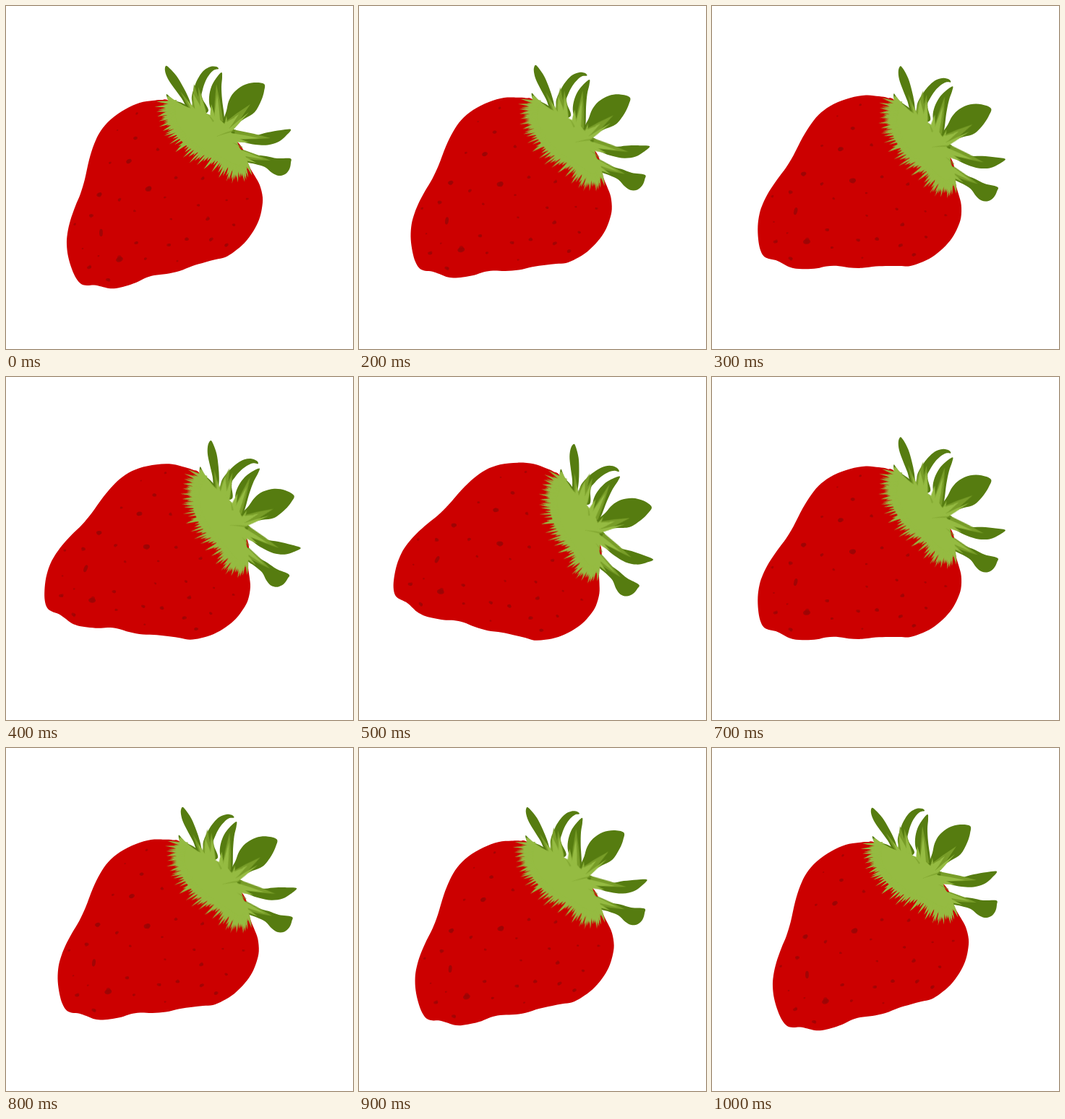
These frames come from a looping animation (480 px wide and 475 px high, 1.1 s). An HTML page:

```html
<!DOCTYPE html>
<html lang="en">
<head>
<meta charset="utf-8">
<title>Rocking strawberry</title>
<style>
  html, body { margin: 0; width: 100%; height: 100%; overflow: hidden; background: #fff; }
  svg { display: block; width: 100vw; height: 100vh; }
</style>
</head>
<body>
<svg viewBox="0 0 480 475">
  <defs>
    <filter id="soft" x="-10%" y="-10%" width="120%" height="120%">
      <feGaussianBlur stdDeviation="0.6"/>
    </filter>
  </defs>
  <g id="berry">
    <g id="body"></g>
    <g id="seeds" fill="#9c0505"></g>
    <g id="leaves" fill="#567c10"></g>
    <g id="calyx" fill="#95bb42" filter="url(#soft)"></g>
  </g>
</svg>
<script>
const RED = '#cc0000', SHADE = '#789d28';
const STEP = 100, STEPS = 11;
const ANGLES = [0, 4.2, 8.4, 14.6, 23.1, 28.6];

const byId = id => document.getElementById(id);
const berry = byId('berry');

function add(parent, tag, attrs) {
  const node = document.createElementNS('http://www.w3.org/2000/svg', tag);
  for (const key in attrs) node.setAttribute(key, attrs[key]);
  byId(parent).appendChild(node);
}

let seed = 11;
function random() {
  seed = (seed * 16807) % 2147483647;
  return seed / 2147483647;
}

const pairs = text => text.trim().split(/\s+/).map(p => p.split(',').map(Number));

// Closed Catmull-Rom curve through the points
function smooth(points) {
  const n = points.length, at = i => points[(i + n) % n];
  let d = 'M' + points[0];
  for (let i = 0; i < n; i++) {
    const [a, b, c, e] = [at(i - 1), at(i), at(i + 1), at(i + 2)];
    const c1 = b.map((v, k) => v + (c[k] - a[k]) / 6);
    const c2 = c.map((v, k) => v - (e[k] - b[k]) / 6);
    d += `C${c1} ${c2} ${c}`;
  }
  return d + 'Z';
}

// Point at u (0..1) along a polyline with evenly weighted segments
function along(points, u) {
  const f = u * (points.length - 1), i = Math.min(Math.floor(f), points.length - 2);
  return points[i].map((v, k) => v + (points[i + 1][k] - v) * (f - i));
}

// Slim tapered hair from a wide base to a pointed tip, bowed sideways
function hair([x1, y1], [x2, y2], width, bow = 0, attrs = {}) {
  const dx = x2 - x1, dy = y2 - y1, len = Math.hypot(dx, dy) || 1;
  const nx = -dy / len, ny = dx / len, h = width / 2;
  const mx = (x1 + x2) / 2 + nx * bow, my = (y1 + y2) / 2 + ny * bow;
  const d = `M${x1 + nx * h},${y1 + ny * h}Q${mx + nx * h * .7},${my + ny * h * .7} ${x2},${y2}` +
            `Q${mx - nx * h * .7},${my - ny * h * .7} ${x1 - nx * h},${y1 - ny * h}Z`;
  add('calyx', 'path', { d, ...attrs });
}

function drawBody() {
  const outline = pairs(`228,132 215,130 203,131 185,134 165,143 145,157 131,173 122,191 115,213
    109,240 103,260 96,277 89,297 85,315 84,330 86,347 91,364 97,377 104,385 112,387 122,386.5
    132,388.5 142,391 152,391 165,388 180,383 192,377 205,373 222,371 240,367 258,360 275,355
    290,351 303,348 316,340 330,328 342,312 350,296 354,280 355,265 351,248 344,235 336,221
    322,190 280,160`);
  add('body', 'path', { d: smooth(outline), fill: RED });
}

function drawSeeds() {
  // x, y, radius
  const spots = pairs(`181,149,2 154,172,1.3 179,183,3 144,217,2 170,215,4 210,199,2.5 197,253,4.6
    235,238,2.6 272,239,2.6 129,261,3.8 157,268,2.6 220,265,1.8 118,290,3 95,302,2 178,284,2
    228,295,1.8 266,276,2.3 279,295,3 305,269,1.7 334,267,2 315,303,2.4 180,328,2.8 225,331,2.8
    250,323,3 284,323,3 305,331,3 157,351,5 193,350,2.2 115,362,3 141,379,3 237,353,1.6
    106,336,1.4 128,346,1.5`);
  const spot = (x, y, rx, ry, turn, opacity) => add('seeds', 'ellipse',
    { cx: x, cy: y, rx, ry, opacity, transform: `rotate(${turn} ${x} ${y})` });
  for (const [x, y, r] of spots) {
    const opacity = Math.min(.9, .3 + r * .16);
    spot(x, y, r, r * .68, -35 + random() * 40, opacity);
    spot(x + (random() - .5) * r, y + (random() - .5) * r, r * .6, r * .75, 0, opacity * .7);
  }
  spot(131.5, 314, 2.4, 5.2, 0, .9);
}

function drawLeaves() {
  [
    '221,83 226,86 236,97 245,112 252,126 257,139 262,150 250,140 243,128 232,113 224,101 220,90',
    '257,130 261,111 267,98 274,89 283,84 291,84 294,87 288,88.5 282,94 276,104 272,116 271,127 280,145 266,150',
    '298,92 299,99 298,112 299,130 302,158 296,166 288,152 282,139 281,126 284,112 290,101',
    '357,108 343,106 328,110 315,120 308,132 305,145 301,158 303,168 317,164 330,156 344,147 353,131 357,118',
    '394,171 380,172 362,175 345,179 328,177 312,170 312,183 330,189 345,192 362,192.5 377,188 387,180',
    '393,211 375,211 360,208 345,206 330,201 318,196 328,214 345,219 358,223 368,231 377,235 386,233 392,226 394,217',
    '222,122 232,130 245,135 258,143 240,142 226,132'
  ].forEach(text => add('leaves', 'path', { d: smooth(pairs(text)) }));
}

function drawCalyx() {
  const shade = { fill: SHADE };
  // Mid-green transitions, then light streaks running into each leaf
  [
    ['264,146', '260,108', 14], ['272,146', '266,112', 10], ['294,160', '291,108', 13],
    ['306,168', '338,136', 15], ['316,178', '366,183', 13], ['326,205', '366,214', 13],
    ['258,144', '241,118', 6]
  ].forEach(([a, b, w]) => hair(pairs(a)[0], pairs(b)[0], w, 0, shade));
  [
    ['268,150', '259,121', 11], ['274,152', '268,120', 8], ['262,148', '250,130', 6],
    ['292,164', '292,122', 9], ['286,158', '284,136', 8], ['300,172', '322,150', 11],
    ['304,170', '305,152', 5], ['306,176', '336,147', 6], ['308,180', '350,183', 9],
    ['312,184', '336,189', 7], ['314,200', '356,212', 9], ['320,208', '346,217', 7]
  ].forEach(([a, b, w]) => hair(pairs(a)[0], pairs(b)[0], w));

  const core = pairs(`224,125 239,134 256,142 267,143 278,149 290,154 300,161 306,169 313,177
    319,186 323,196 331,207 333,219 326,229 312,226 300,219 284,210 268,204 252,195 240,184
    233,173 229,160 225,146 225,135`);
  add('calyx', 'path', { d: smooth(core) });

  const roots = pairs(`236,133 234,142 234,150 236,160 242,170 254,184 269,196 283,203 299,210
    312,217 319,220 326,220 329,212`);
  const tips = pairs(`206,132 205,145 207,157 212,169 216,181 232,200 248,216 266,222 283,232
    303,242 316,250 333,245 341,236`);
  const count = 64;
  for (let i = 0; i < count; i++) {
    const u = i / (count - 1);
    const root = along(roots, u), tip = along(tips, u);
    const reach = i % 3 ? .52 + random() * .34 : .84 + random() * .18;
    const end = root.map((v, k) => v + (tip[k] - v) * reach);
    hair(root, end, 4.2 + random() * 2, (random() - .5) * 4);
  }

  // Faint creases near the leaf bases
  [['299,163', '316,154'], ['290,181', '318,172'], ['313,189', '327,196'], ['279,150', '287,160']]
    .forEach(([a, b]) => hair(pairs(b)[0], pairs(a)[0], 2.4, 1, { fill: SHADE, opacity: .6 }));
}

function render(time) {
  const step = Math.floor(time / STEP) % STEPS;
  const angle = ANGLES[5 - Math.abs(5 - step)];
  berry.setAttribute('transform', `rotate(${angle} 240 237.5)`);
}

drawBody();
drawSeeds();
drawLeaves();
drawCalyx();

const start = performance.now();
function tick() {
  render(performance.now() - start);
  requestAnimationFrame(tick);
}
tick();
</script>
</body>
</html>
```
